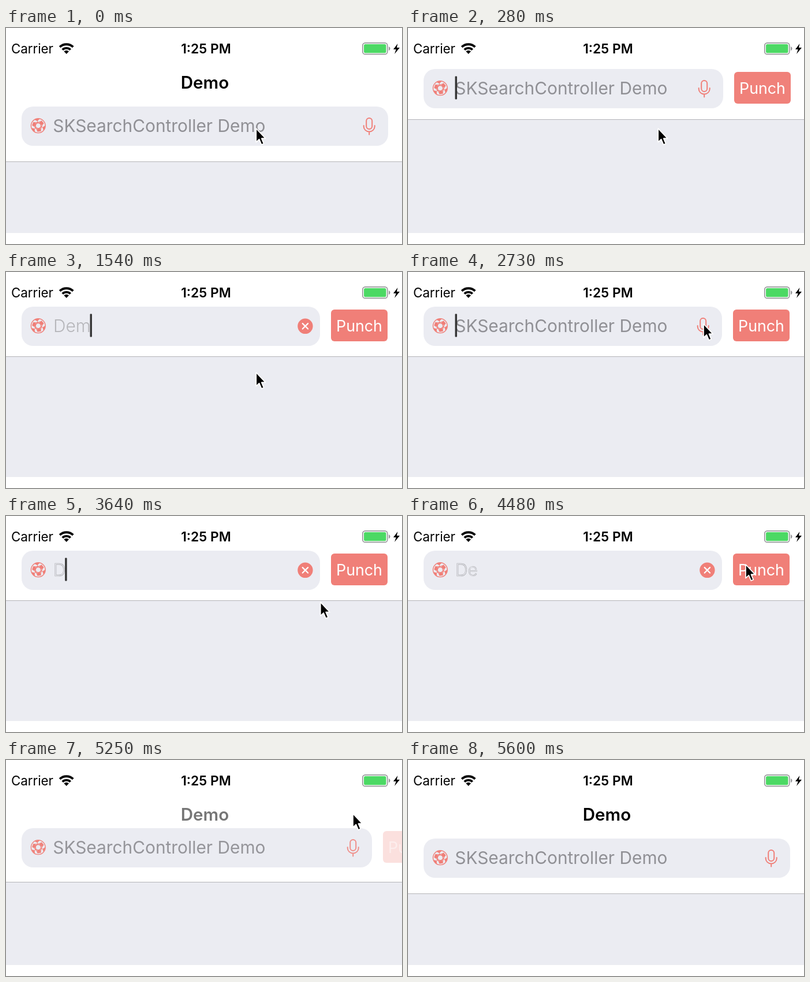
An HTML page for the animation above (5.67 s loop, 686 px wide and 374 px high).

```html
<!DOCTYPE html>
<html lang="en">
<head>
<meta charset="utf-8">
<title>Search bar demo</title>
<style>
  html, body { margin: 0; width: 100%; height: 100%; overflow: hidden; background: #fff; }
  svg { display: block; width: 686px; height: 374px; font-family: Inter, "Liberation Sans", sans-serif; }
  .field { font-size: 29.85px; }
  .typed { fill: #b6b6ba; font-weight: 300; }
  .typed.faint { fill: none; stroke: #a0a0a4; stroke-width: .6px; }
  .line { fill: none; stroke: #f07f78; stroke-linecap: round; }
  .coral { fill: #f07f78; }
</style>
</head>
<body>
<svg viewBox="0 0 686 374">
  <rect width="686" height="374" fill="#fff"/>
  <rect id="page" width="686" fill="#ebecf2"/>
  <rect id="divider" width="686" height="1" fill="#b4b4b8"/>

  <g id="status">
    <text x="9" y="43.5" font-size="22.3">Carrier</text>
    <g transform="translate(104.7 45)">
      <path d="M0 0L-4.3-4.6A6.3 6.3 0 0 1 4.3-4.6Z"/>
      <path d="M-7-7.3A10.1 10.1 0 0 1 7-7.3M-11.6-12.1A16.8 16.8 0 0 1 11.6-12.1" fill="none" stroke="#000" stroke-width="3.8"/>
    </g>
    <text x="346.4" y="43.5" font-size="22.8" font-weight="600" text-anchor="middle">1:25 PM</text>
    <rect x="617.8" y="25.8" width="43" height="19.6" rx="4.5" fill="#fff" stroke="#98989b" stroke-width="1.7"/>
    <rect x="620" y="28" width="38.5" height="15.2" rx="2.5" fill="#4cd964"/>
    <path d="M663 32q2.6 1 2.6 3.6t-2.6 3.6z" fill="#98989b"/>
    <path d="M678.5 27L671 37h4.7l-2.6 8L682 34h-5z"/>
  </g>

  <text id="title" x="344.5" y="105" font-size="29.6" font-weight="600" text-anchor="middle">Demo</text>

  <g id="bar">
    <rect id="box" x="27" height="68" rx="20" fill="#ebecf2"/>
    <g id="ball" transform="translate(55.8 33.2)">
      <circle class="line" r="12.4" stroke-width="1.4"/>
    </g>
    <text id="hint" class="field" x="81.3" y="43.5" fill="#909095">SKSearchController Demo</text>
    <text id="typed" class="field typed" x="82" y="43.5"></text>
    <rect id="caret" y="12.5" width="3.4" height="40" rx="1" fill="#333"/>
    <g id="mic" class="line" stroke-width="2">
      <rect x="-5" y="20" width="10" height="19" rx="5"/>
      <path d="M-9.5 33v1.5a9.5 9 0 0 0 19 0v-1.5M0 43.5v5"/>
    </g>
    <g id="clear">
      <circle class="coral" cy="33.8" r="13.2"/>
      <path d="M-4.7 29.1l9.4 9.4m0-9.4l-9.4 9.4" stroke="#fff" stroke-width="2.2" stroke-linecap="round"/>
    </g>
  </g>

  <g id="button">
    <rect class="coral" width="98" height="55" rx="6"/>
    <text id="label" x="49" y="38" font-size="26.8" fill="#fff" text-anchor="middle">Punch</text>
  </g>

  <path id="mouse" d="M0 0V23.6L5.3 18.6 9.3 28 13.3 26.3 9.4 17.2H16.2Z" stroke="#fff" stroke-width="1.7" stroke-linejoin="round"/>
</svg>
<script>
const LOOP = 5670;
const $ = id => document.getElementById(id);
const set = (id, attrs) => { for (const k in attrs) $(id).setAttribute(k, attrs[k]); };
const clamp = v => Math.max(0, Math.min(1, v));
const lerp = (a, b, p) => a + (b - a) * p;
const ease = (t, start, duration) => {
  const u = clamp((t - start) / duration);
  return u * u * (3 - 2 * u);
};

// Field content from each moment on; every entry restarts the caret blink.
const edits = [[200, ''], [820, 'D'], [1000, 'De'], [1190, 'Dem'], [1600, 'Demo'],
               [2650, ''], [3280, 'D'], [3840, 'De'], [5000, '']];
// Pointer stops: time, x, y
const stops = [[0, 433.3, 174], [2000, 433.3, 174], [2560, 512, 90], [3010, 512, 90],
               [3520, 540, 152], [3660, 545, 149], [4200, 616, 141], [4440, 585, 84],
               [4560, 585, 84], [4860, 601, 93], [LOOP, 601, 93]];

// Open hexagon in the middle, filled patches on alternate corners and at the rim
function drawBall() {
  const add = (d, kind, angle) => {
    const p = document.createElementNS('http://www.w3.org/2000/svg', 'path');
    p.setAttribute('d', d);
    p.setAttribute('class', kind);
    p.setAttribute('transform', `rotate(${angle})`);
    $('ball').append(p);
  };
  for (let angle = -40; angle < 320; angle += 120) {
    add('M4.2 0L6-3.8 10.2-3.2V3.2L6 3.8Z', 'coral', angle);
    add('M-8 0L-11.4-4.6A12.4 12.4 0 0 0-11.4 4.6Z', 'coral', angle);
    add('M-5 0H-8M6-3.8L2.5-5.2M6 3.8L2.5 5.2M-5 0L-2-5.2H2.5M-5 0L-2 5.2H2.5', 'line', angle);
  }
}

function pointer(t) {
  const i = stops.findIndex(s => s[0] > t);
  const [t0, x0, y0] = stops[i - 1], [t1, x1, y1] = stops[i];
  const p = ease(t, t0, t1 - t0);
  return [lerp(x0, x1, p), lerp(y0, y1, p)];
}

function draw(t) {
  const closing = ease(t, 5037, 312);
  const lift = ease(t, 43, 312) - closing;
  const shrink = ease(t, 40, 260) - closing;
  const top = Math.round(lerp(136, 60, lift));
  const right = Math.round(lerp(662, 544, shrink));
  const edge = Math.floor(lerp(231, 146, lift));

  set('page', { y: edge, height: 355 - edge });
  set('divider', { y: edge });
  set('title', { opacity: clamp(1 - 2 * lift) });
  set('bar', { transform: `translate(0 ${top})` });
  set('box', { width: right - 27 });
  set('button', { transform: `translate(${right + 19} ${top + 5})`, opacity: shrink });
  set('label', { opacity: t > 4900 ? .45 : 1 });

  const [since, text] = edits.filter(e => e[0] <= t).pop() || [0, ''];
  const leaving = t >= 5000;
  $('typed').textContent = text;
  $('typed').classList.toggle('faint', t > 2650);
  const blink = (t - since) % 1000;
  const caretOn = since && !leaving ? 1 - clamp((blink - 480) / 80) + clamp((blink - 940) / 60) : 0;
  set('caret', { x: text ? 80.7 + $('typed').getComputedTextLength() : 81.5, opacity: caretOn });
  set('hint', { opacity: text ? 0 : leaving ? .75 + .25 * closing : 1 });
  set('ball', { opacity: leaving ? .8 + .2 * closing : 1 });
  set('mic', { transform: `translate(${right - 32.8} 0)`, opacity: text ? 0 : leaving ? clamp(closing * 1.5 - .3) : 1 });
  set('clear', { transform: `translate(${right - 25.6} 0)`, opacity: text ? 1 : 0 });

  const [x, y] = pointer(t);
  set('mouse', { transform: `translate(${x} ${y})`, opacity: t < 5380 ? 1 : 0 });
}

drawBall();
function tick() {
  draw(performance.now() % LOOP);
  requestAnimationFrame(tick);
}
tick();
</script>
</body>
</html>
```
